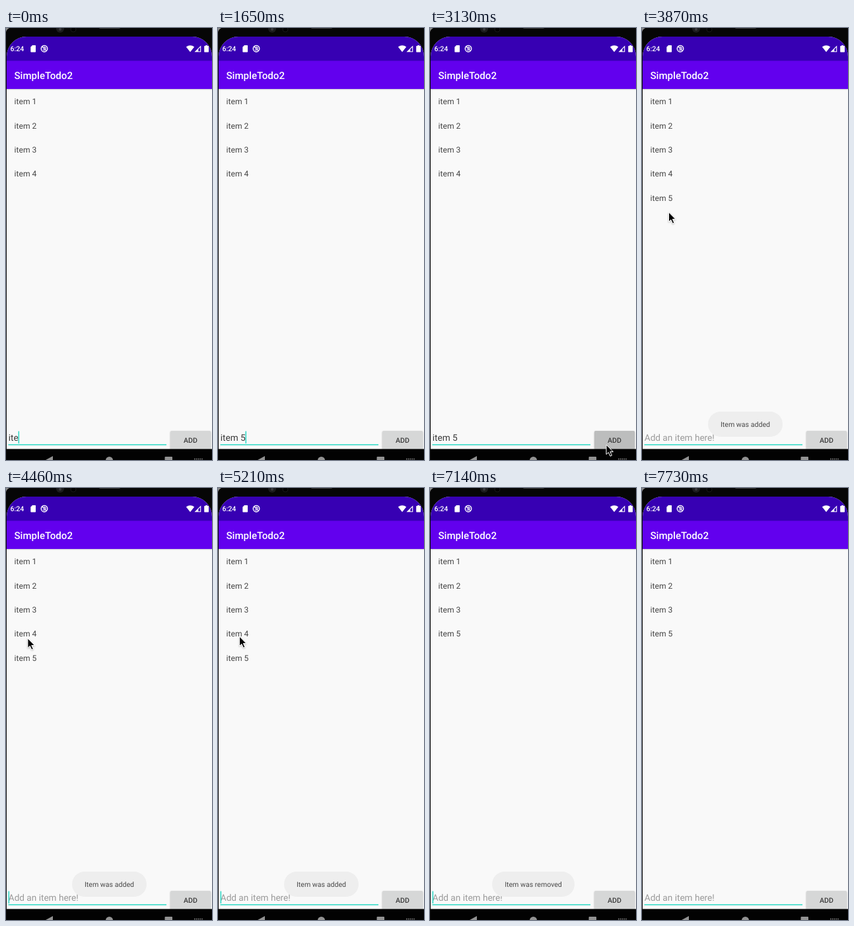
An HTML page for the animation above (8000 ms loop, 312 by 652 pixels).

```html
<!DOCTYPE html>
<html lang="en">
<head>
<meta charset="utf-8">
<title>Todo list</title>
<style>
  html, body { margin: 0; width: 100%; height: 100%; overflow: hidden; background: #060606; }
  svg { display: block; width: 100%; height: 100%; }
  text { font-family: Roboto, sans-serif; text-rendering: geometricPrecision; white-space: pre; }
  .list text { font-size: 12.1px; fill: #454545; }
  .small { font-size: 10.6px; }
  .medium { font-weight: 500; }
  .middle { text-anchor: middle; }
</style>
</head>
<body>
<svg viewBox="0 0 312 652">
  <defs>
    <clipPath id="screen"><path d="M1 652V43A30 30 0 0 1 31 13H282A30 30 0 0 1 312 43V652z"/></clipPath>
    <clipPath id="buttonShape"><rect x="249" y="608" width="61" height="28" rx="1.5"/></clipPath>
    <filter id="shadow" x="-20%" y="-20%" width="140%" height="150%">
      <feDropShadow dx="0" dy="1" stdDeviation="0.8" flood-opacity="0.3"/>
    </filter>
  </defs>

  <!-- Phone bezel -->
  <rect width="312" height="652" fill="#060606"/>
  <path d="M0 6Q1 2 5 0H0z" fill="#8a8a8a"/>
  <circle cx="82" cy="1" r="6" fill="#1c1c1e"/>
  <circle cx="82" cy="2" r="2" fill="#3a3a3e"/>
  <circle cx="102" cy="2" r="4" fill="#000" stroke="#191919"/>
  <rect x="141" y="-2" width="32" height="3" rx="1.5" fill="#3c3c3c"/>

  <g clip-path="url(#screen)">
    <rect y="13" width="312" height="623" fill="#f9f9f9"/>
    <rect y="92" width="312" height="1" fill="#d5d3da"/>
    <rect y="93" width="312" height="1" fill="#efeff0"/>
    <rect y="13" width="312" height="37" fill="#3700b3"/>
    <rect y="49.5" width="312" height="42.5" fill="#6200ee"/>

    <!-- Status bar -->
    <g fill="#fff">
      <text class="small medium" x="6.5" y="35.3">6:24</text>
      <path d="M40 26H44.2Q45 26 45 26.8V35.7Q45 36.5 44.2 36.5H38.1Q37.3 36.5 37.3 35.7V28.7z"/>
      <circle cx="58" cy="31.2" r="4.7" fill="none" stroke="#fff" stroke-width="1.5"/>
      <path d="M55 28.2L61 34.2M56 32.5A2.3 2.3 0 0 0 58.5 33.5M57.5 29A2.3 2.3 0 0 1 60.2 31.5" fill="none" stroke="#fff" stroke-width="1.4"/>
      <path d="M272.8 28.6Q279 24 285.2 28.6L279 36.3z"/>
      <path d="M286.8 35.7H294.7V27.8z" fill="none" stroke="#fff" stroke-width="1.1"/>
      <path d="M291.3 31.2V35.7H287z"/>
      <path d="M302.2 25.9H305V27H306.3Q307 27 307 27.7V35.8Q307 36.5 306.3 36.5H300.9Q300.2 36.5 300.2 35.8V27.7Q300.2 27 300.9 27H302.2z"/>
      <text class="medium" x="12.5" y="77" font-size="15.1">SimpleTodo2</text>
    </g>

    <g class="list" id="list"></g>

    <!-- Entry row -->
    <text id="entry" x="3.8" y="622.8" font-size="13.6"></text>
    <rect x="3.5" y="628.1" width="239.5" height="1.7" fill="#45decc"/>
    <rect id="caret" y="608.5" width="1.5" height="18.5" fill="#2bd9c6"/>
    <rect x="249" y="608" width="61" height="28" rx="1.5" fill="#d6d7d7" filter="url(#shadow)"/>
    <circle id="ripple" cx="268" cy="629" fill="#000" clip-path="url(#buttonShape)"/>
    <text class="small medium middle" x="279.5" y="625.8" fill="#3c3c3c">ADD</text>

    <g id="toast">
      <rect id="toastBox" y="579" height="38" rx="19" fill="#eee"/>
      <text id="toastText" class="small middle" x="156.5" y="602.3" fill="#4a4a4a"></text>
    </g>

    <!-- Navigation bar -->
    <rect y="635.4" width="312" height="17" fill="#020202"/>
    <g fill="#929292">
      <path d="M60 652L71 646V658z"/>
      <circle cx="156.5" cy="652.5" r="5.5"/>
      <rect x="240.5" y="647" width="11.5" height="11" rx="1"/>
      <path d="M285 650.3H298M285 652.3H298" stroke="#929292" stroke-width="1.2" stroke-dasharray="1.5 1.3"/>
    </g>
  </g>

  <path id="cursor" d="M0 0V14.5L3.3 11.5L6 17.2L8.4 16.1L5.8 10.6H10.4z" fill="#000" stroke="#fff" stroke-width="1" stroke-linejoin="round" filter="url(#shadow)"/>
</svg>

<script>
const LOOP = 8000, TICK = 148.7;
const PRESS = 2980, ADDED = 3430, REMOVED = 5500, POINTER_EXIT = 6200;
const KEYSTROKES = [150, 600, 1650];
const BLINK = 460;

// Each glide takes the pointer from its last stop to a new one.
const glides = [
  { start: 2690, end: 2830, to: [267, 629] },
  { start: 3430, end: 3870, to: [40.5, 278] },
  { start: 4020, end: 4620, to: [32.5, 224] },
  { start: 5650, end: 5950, to: [79, 243] },
  { start: 5950, end: 6100, to: [222, 434] }
];

const $ = id => document.getElementById(id);
const clamp = x => Math.max(0, Math.min(1, x));
const ease = x => x * x * (3 - 2 * x);
const set = (id, attributes) =>
  Object.entries(attributes).forEach(([name, value]) => $(id).setAttribute(name, value));

const rows = Array.from({ length: 5 }, (_, i) => {
  const row = document.createElementNS("http://www.w3.org/2000/svg", "text");
  row.setAttribute("x", 12.6);
  row.setAttribute("y", 115.2 + i * 36.4);
  return $("list").appendChild(row);
});

function drawList(t) {
  const items = [1, 2, 3, 4, 5].filter(n => n === 4 ? t < REMOVED : n < 5 || t >= ADDED);
  rows.forEach((row, i) => row.textContent = items[i] ? `item ${items[i]}` : "");
}

function drawEntry(t) {
  const strokes = KEYSTROKES.filter(time => time <= t);
  const text = t < ADDED ? "item 5".slice(0, [3, 4, 5, 6][strokes.length]) : "";
  const lastEdit = t < ADDED ? strokes.at(-1) ?? 0 : ADDED;
  $("entry").textContent = text || "Add an item here!";
  set("entry", { fill: text ? "#383838" : "#999" });
  set("caret", {
    x: 3.6 + (text && $("entry").getComputedTextLength()),
    opacity: (t - lastEdit) % (2 * BLINK) < BLINK ? 1 : 0
  });
}

function drawRipple(t) {
  const age = t - PRESS;
  set("ripple", {
    r: 60 * clamp(age / 240),
    opacity: age < 0 ? 0 : 0.12 * clamp((ADDED + 100 - t) / 250)
  });
}

function drawToast(t) {
  const removed = t >= REMOVED;
  const age = t - (removed ? REMOVED : ADDED);
  const width = removed ? 125 : 113;
  $("toastText").textContent = `Item was ${removed ? "removed" : "added"}`;
  set("toastBox", { x: 156.5 - width / 2, width });
  set("toast", { opacity: clamp(Math.min(age / 250, (2200 - age) / 300)) });
}

function drawPointer(t) {
  let [x, y] = [300, 640];
  for (const { start, end, to } of glides) {
    const progress = ease(clamp((t - start) / (end - start)));
    x += (to[0] - x) * progress;
    y += (to[1] - y) * progress;
  }
  const visible = t >= glides[0].start && t < POINTER_EXIT;
  set("cursor", { transform: `translate(${x} ${y})`, opacity: visible ? 1 : 0 });
}

function frame() {
  const elapsed = performance.now() % LOOP;
  const t = Math.floor(elapsed / TICK + 0.05) * TICK + TICK / 2;
  [drawList, drawEntry, drawRipple, drawToast, drawPointer].forEach(draw => draw(t));
  requestAnimationFrame(frame);
}
frame();
</script>
</body>
</html>
```
